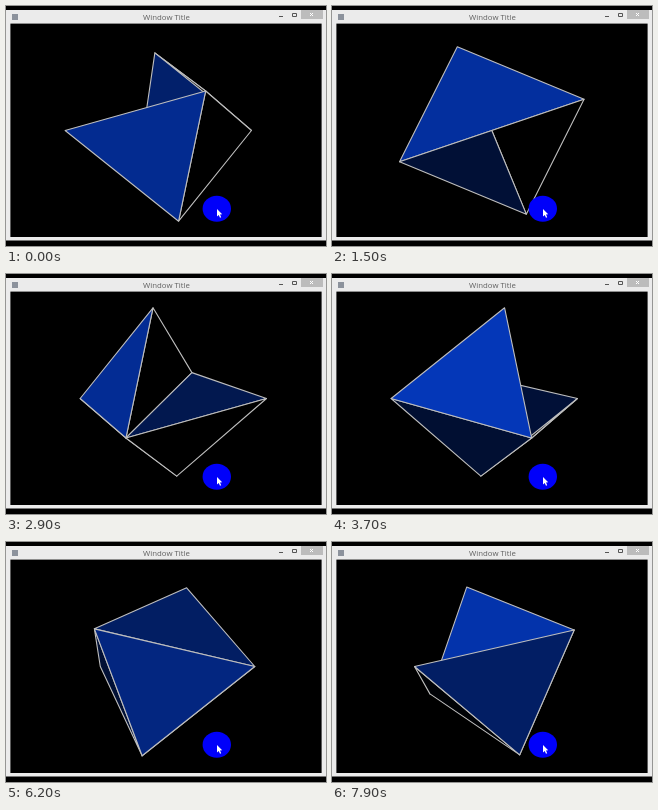
Animation, 320 px wide and 240 px high, one loop 8 s. Source, as an HTML page with a canvas:

```html
<!DOCTYPE html>
<html lang="en">
<head>
<meta charset="utf-8">
<title>Window Title</title>
<style>
  html, body { margin: 0; width: 100%; height: 100%; overflow: hidden; background: #000; }
  canvas { display: block; width: 320px; height: 240px; }
</style>
</head>
<body>
<canvas id="stage" width="320" height="240"></canvas>
<script>
const ctx = document.getElementById('stage').getContext('2d');
const LOOP = 8000, STEP = 200;
const RADIUS = 89.3, CAMERA = 378, STRETCH = 1.103, TILT = 20.5 * Math.PI / 180;
const CENTER = { x: 159.8, y: 124.5 };
const LIGHT = [-100, -60, 220], SHADE_OFFSET = -62;

// Front and back are the two tips; the others form the tilted square between them.
// The solid lacks the wedge between front, top, left and right.
const FACES = [
  ['front', 'right', 'bottom'], ['front', 'bottom', 'left'], ['front', 'left', 'right'],
  ['top', 'right', 'left'],
  ['back', 'bottom', 'right'], ['back', 'right', 'top'],
  ['back', 'top', 'left'], ['back', 'left', 'bottom']
];

// Coordinates: x right, y down, z towards the viewer.
function vertices(yaw) {
  const s = Math.sin(yaw), c = Math.cos(yaw);
  const inSquare = (across, down) => [across * s * RADIUS, down * RADIUS, across * c * RADIUS];
  const tip = side => [-side * c * RADIUS, 0, side * s * RADIUS];
  const sinT = Math.sin(TILT), cosT = Math.cos(TILT);
  return {
    top: inSquare(-sinT, -cosT), bottom: inSquare(sinT, cosT),
    right: inSquare(cosT, -sinT), left: inSquare(-cosT, sinT),
    front: tip(1), back: tip(-1)
  };
}

function project([x, y, z]) {
  const k = CAMERA / (CAMERA - z);
  return [CENTER.x + x * k * STRETCH, CENTER.y + y * k];
}

function normal([a, b, c]) {
  const u = b.map((v, i) => v - a[i]), w = c.map((v, i) => v - a[i]);
  const n = [u[1] * w[2] - u[2] * w[1], u[2] * w[0] - u[0] * w[2], u[0] * w[1] - u[1] * w[0]];
  return n.map(v => v / Math.hypot(...n));
}

function shade(face) {
  const dot = normal(face).reduce((sum, v, i) => sum + v * LIGHT[i], 0);
  const blue = Math.max(0, dot + SHADE_OFFSET);
  return `rgb(${blue * 0.02}, ${blue * 0.3}, ${blue})`;
}

function polygon(points) {
  ctx.beginPath();
  points.forEach(p => ctx.lineTo(...p));
  ctx.closePath();
}

function drawSolid(yaw) {
  const v = vertices(yaw);
  const depth = face => face.reduce((sum, p) => sum + p[2], 0);
  const faces = FACES.map(names => names.map(name => v[name]))
    .filter(face => normal(face)[2] > 0)
    .sort((a, b) => depth(a) - depth(b));
  ctx.lineWidth = 1.1;
  ctx.lineJoin = 'round';
  ctx.strokeStyle = '#bebebe';
  for (const face of faces) {
    polygon(face.map(project));
    ctx.fillStyle = shade(face);
    ctx.fill();
    ctx.stroke();
  }
}

function rect(color, ...box) {
  ctx.fillStyle = color;
  ctx.fillRect(...box);
}

function drawWindow() {
  rect('#000', 0, 0, 320, 240);
  rect('#ebebeb', 0, 4, 320, 230.5);
  rect('#000', 4.4, 17.6, 311.2, 213.4);
  rect('#8c929c', 6, 8, 6, 6);
  ctx.fillStyle = '#606060';
  ctx.font = '7.8px "Open Sans", sans-serif';
  ctx.textAlign = 'center';
  ctx.fillText('Window Title', 160.5, 14.2);
  rect('#555', 273, 10, 4, 1);
  ctx.lineWidth = 1;
  ctx.strokeStyle = '#555';
  ctx.strokeRect(286.5, 7.5, 4, 3);
  rect('#bcbcbc', 295, 4, 22, 9);
  ctx.strokeStyle = '#fff';
  ctx.beginPath();
  ctx.moveTo(304, 7); ctx.lineTo(307, 10);
  ctx.moveTo(307, 7); ctx.lineTo(304, 10);
  ctx.stroke();
}

function drawPointer() {
  ctx.fillStyle = '#0000fa';
  ctx.beginPath();
  ctx.ellipse(210.8, 202.8, 14.2, 13, 0, 0, 2 * Math.PI);
  ctx.fill();
  polygon([[211, 203], [211, 210.5], [212.7, 209], [214, 211.8], [215.2, 211.2], [214, 208.5], [216.2, 208.3]]);
  ctx.fillStyle = '#fff';
  ctx.fill();
}

function draw(now) {
  const t = now % LOOP;
  const turns = Math.max(0, Math.floor((t - 100) / STEP));
  drawWindow();
  drawSolid((20 + 10 * turns) * Math.PI / 180);
  drawPointer();
  requestAnimationFrame(() => draw(performance.now() - start));
}

const start = performance.now();
draw(0);
</script>
</body>
</html>
```
